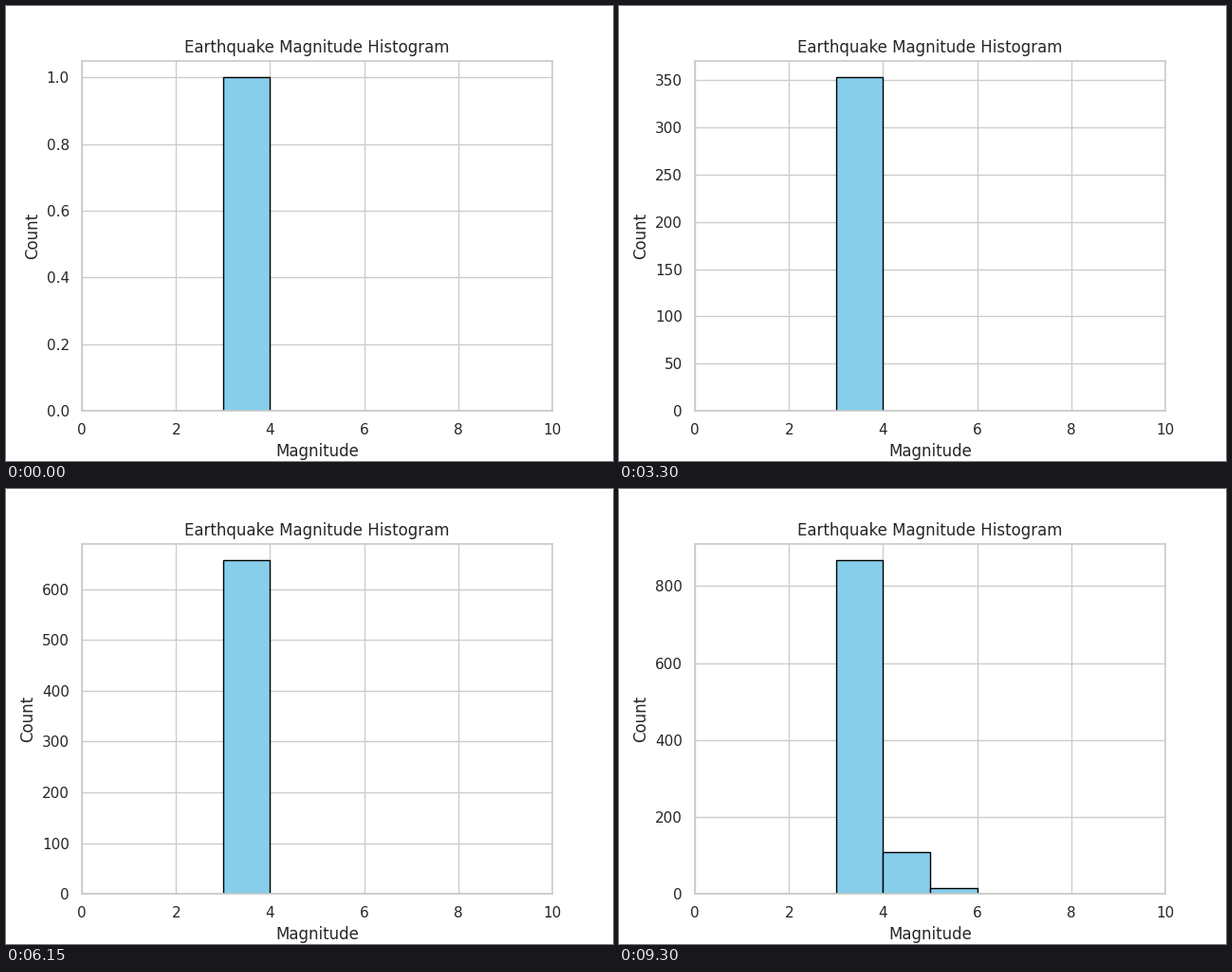
A matplotlib script for the animation above (9450 ms loop, 640x480 px).

```python
import numpy as np
import matplotlib.pyplot as plt
from matplotlib.animation import FuncAnimation

FRAMES, INTERVAL, STEP = 63, 150, 16
INK, GRID = "0.15", "0.8"

plt.rcParams.update({
    "font.family": "DejaVu Sans",
    "font.size": 12,
    "text.color": INK,
    "axes.labelcolor": INK,
    "axes.labelsize": 12,
    "axes.titlesize": 12,
    "axes.edgecolor": GRID,
    "axes.linewidth": 1.25,
    "axes.axisbelow": True,
    "axes.grid": True,
    "grid.color": GRID,
    "grid.linewidth": 1,
    "patch.linewidth": 1,
    "lines.solid_capstyle": "round",
})
for axis, side in (("xtick", "bottom"), ("ytick", "left")):
    plt.rcParams.update({
        f"{axis}.color": INK,
        f"{axis}.labelsize": 11,
        f"{axis}.major.size": 6,
        f"{axis}.major.width": 1.25,
        f"{axis}.{side}": False,
    })

# Magnitudes in ascending order, revealed a batch at a time
magnitudes = np.repeat([3.5, 4.5, 5.5], [867, 110, 16])

fig, ax = plt.subplots(figsize=(6.4, 4.8), dpi=100)


def update(i):
    ax.clear()
    ax.hist(magnitudes[:i * STEP + 1], bins=range(11),
            color="skyblue", edgecolor="black")
    ax.set_xlim(0, 10)
    ax.set_title("Earthquake Magnitude Histogram")
    ax.set_xlabel("Magnitude")
    ax.set_ylabel("Count")


anim = FuncAnimation(fig, update, frames=FRAMES, init_func=lambda: None,
                     interval=INTERVAL, repeat=True, repeat_delay=0)
plt.show()
```
